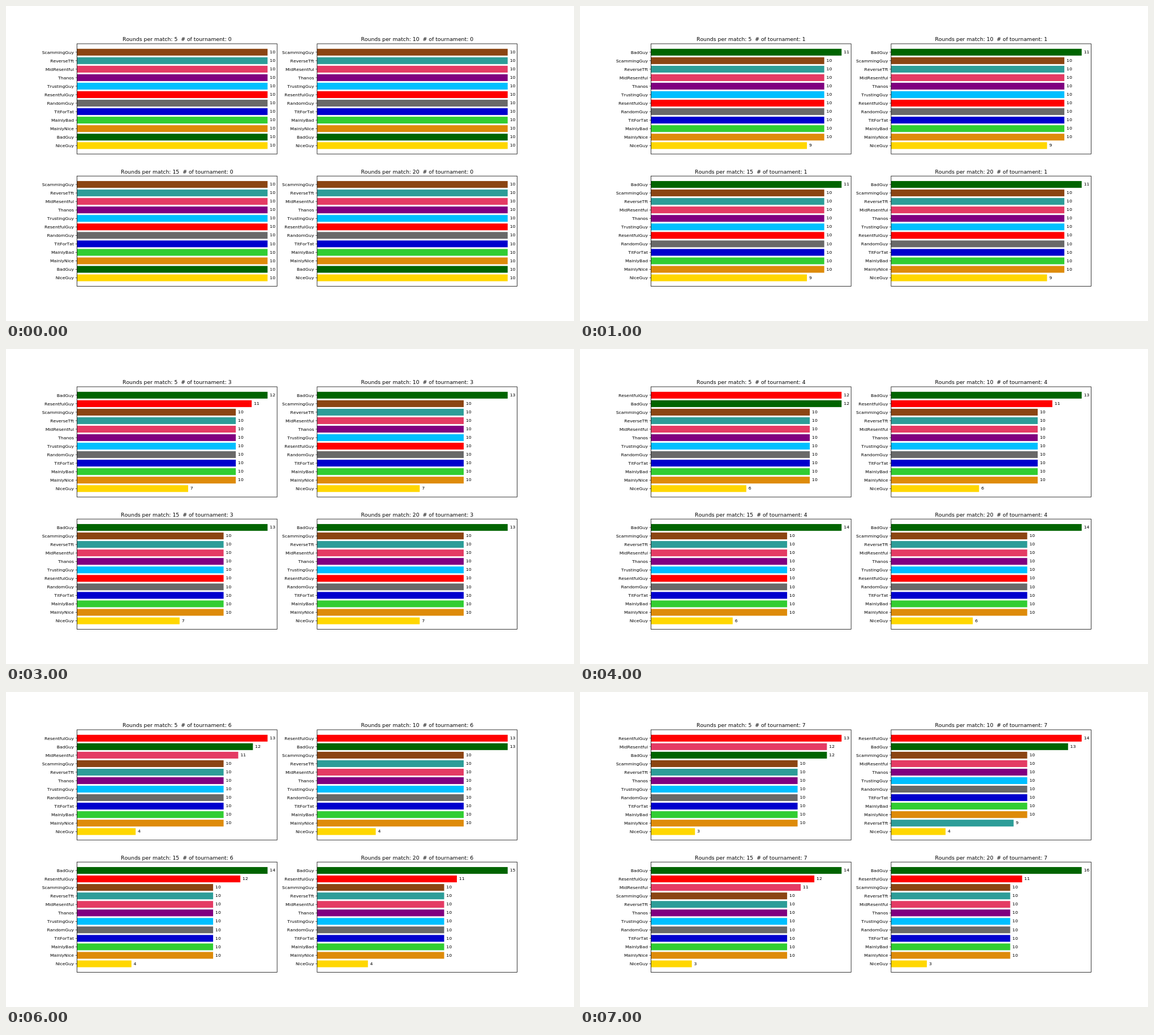
Animation, 1004 px wide and 558 px high, one loop 8 s. Source, as an HTML page with a canvas:

```html
<!DOCTYPE html>
<html lang="en">
<head>
<meta charset="utf-8">
<title>Tournament scores</title>
<style>
html, body { margin: 0; width: 100%; height: 100%; overflow: hidden; background: #fff; }
canvas { display: block; }
</style>
</head>
<body>
<canvas id="stage" width="1004" height="558"></canvas>
<script>
const ctx = document.getElementById('stage').getContext('2d');

// Listed bottom to top; ties keep this order.
const players = [
  ['NiceGuy', '#ffd700'],
  ['BadGuy', '#006400'],
  ['MainlyNice', '#de8b0a'],
  ['MainlyBad', '#32cd32'],
  ['TitForTat', '#0000cd'],
  ['RandomGuy', '#696969'],
  ['ResentfulGuy', '#ff0000'],
  ['TrustingGuy', '#00bfff'],
  ['Thanos', '#800080'],
  ['MidResentful', '#e43b64'],
  ['ReverseTft', '#2d9d98'],
  ['ScammingGuy', '#8b4513']
];
const NICE = 0, BAD = 1, RES = 6, MID = 9, REV = 10;

// Each tournament moves one point from a loser (NiceGuy by default) to a winner.
const panels = [
  { rounds: 5, wins: [BAD, BAD, RES, RES, RES, MID, MID] },
  { rounds: 10, wins: [BAD, BAD, BAD, RES, RES, RES, RES], losers: { 6: REV } },
  { rounds: 15, wins: [BAD, BAD, BAD, BAD, RES, RES, MID] },
  { rounds: 20, wins: [BAD, BAD, BAD, BAD, BAD, RES, BAD] }
];

// Layout on an 1800 x 1000 figure at 100 dpi.
const SCALE = 1004 / 1800, PT = 100 / 72;
const W = 1395 / 2.2, H = 770 / 2.2;
const ROW = H / 12.98;

function scoresAt({ wins, losers = {} }, n) {
  const scores = players.map(() => 10);
  for (let i = 0; i < n; i++) {
    scores[wins[i]]++;
    scores[losers[i] ?? NICE]--;
  }
  return scores;
}

function text(str, x, y, pt, align) {
  ctx.font = `${pt * PT}px "DejaVu Sans", sans-serif`;
  ctx.textAlign = align;
  ctx.fillStyle = '#000';
  ctx.fillText(str, x, y);
}

function drawPanel(panel, i, n) {
  const x = 225 + (i % 2) * W * 1.2;
  const y = 120 + (i >> 1) * H * 1.2;
  const scores = scoresAt(panel, n);
  const unit = W / 1.05 / Math.max(...scores);
  const order = players.map((_, k) => k).sort((a, b) => scores[b] - scores[a] || b - a);

  text(`Rounds per match: ${panel.rounds}  # of tournament: ${n}`, x + W / 2, y - 6 * PT, 12, 'center');

  order.forEach((k, row) => {
    const [name, color] = players[k];
    const mid = y + (row + 0.99) * ROW;
    const len = scores[k] * unit;
    ctx.fillStyle = color;
    ctx.fillRect(x, mid - 0.4 * ROW, len, 0.8 * ROW);
    text(name, x - 7 * PT, mid + 3.8 * PT, 10, 'right');
    text(scores[k], x + len + 5 * PT, mid + 2.76 * PT, 10, 'left');
    ctx.fillStyle = '#000';
    ctx.fillRect(x - 3.5 * PT, mid - 0.6, 3.5 * PT, 1.2);
  });

  ctx.lineWidth = 1.4;
  ctx.strokeStyle = '#000';
  ctx.strokeRect(x, y, W, H);
}

function frame(now) {
  const n = Math.floor(now % 8000 / 1000);
  ctx.setTransform(1, 0, 0, 1, 0, 0);
  ctx.fillStyle = '#fff';
  ctx.fillRect(0, 0, 1004, 558);
  ctx.scale(SCALE, SCALE);
  panels.forEach((panel, i) => drawPanel(panel, i, n));
  requestAnimationFrame(frame);
}

ctx.fontKerning = 'none';
requestAnimationFrame(frame);
</script>
</body>
</html>
```
